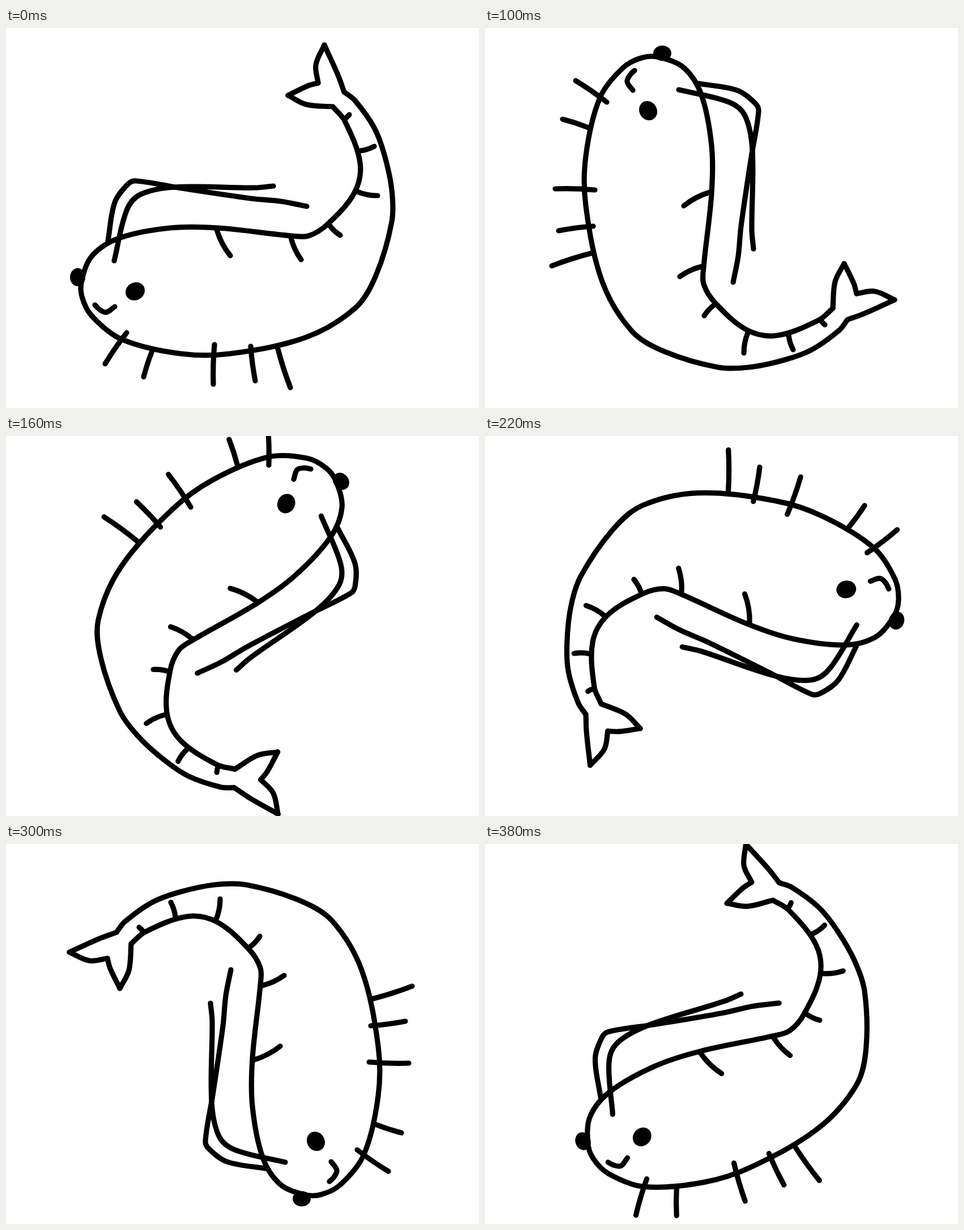
Animation, 835 px wide and 671 px high, one loop 0.4 s. Source, as an HTML page:

```html
<!DOCTYPE html>
<html lang="en">
<head>
<meta charset="utf-8">
<title>Spinning shrimp</title>
<style>
  html, body { margin: 0; width: 100%; height: 100%; overflow: hidden; background: #fff; }
  svg { display: block; }
</style>
</head>
<body>
<svg width="835" height="671">
  <g id="shrimp" fill="none" stroke="#000" stroke-width="9.2" stroke-linecap="round" stroke-linejoin="round">
    <g fill="#000" stroke="none">
      <ellipse id="nose" cx="126.5" cy="440" rx="13.5" ry="16"/>
      <ellipse id="eye" cx="228" cy="465" rx="17.5" ry="15.5" transform="rotate(-30 228 465)"/>
    </g>
  </g>
</svg>
<script>
const STEP_MS = 20, STEPS = 20;
const shrimp = document.getElementById('shrimp');

function addPath(d) {
  const path = document.createElementNS(shrimp.namespaceURI, 'path');
  path.setAttribute('d', d);
  shrimp.append(path);
}

const parse = text => text.split(' ').map(s => s.split(',').map(Number));

// Smooth stroke through key points; handles are a third of each chord
function curve(text) {
  const p = parse(text);
  const at = i => p[Math.max(0, Math.min(p.length - 1, i))];
  const handle = (i, length) => {
    const [ax, ay] = at(i - 1), [bx, by] = at(i + 1);
    const k = length / 3 / Math.hypot(bx - ax, by - ay);
    return [p[i][0] + (bx - ax) * k, p[i][1] + (by - ay) * k];
  };
  let d = 'M' + p[0];
  for (let i = 1; i < p.length; i++) {
    const chord = Math.hypot(p[i][0] - p[i - 1][0], p[i][1] - p[i - 1][1]);
    d += `C${handle(i - 1, chord)} ${handle(i, -chord)} ${p[i]}`;
  }
  addPath(d);
}

// Short stroke between two points, bent sideways by a share of its length
function tick(text, bow) {
  const [[ax, ay], [bx, by]] = parse(text);
  const cx = (ax + bx) / 2 - (by - ay) * bow;
  const cy = (ay + by) / 2 + (bx - ax) * bow;
  addPath(`M${ax} ${ay}Q${cx} ${cy} ${bx} ${by}`);
}

const body = '597,113 616,128 650,176 668,224 681,286 681,342 653,437 617,494 530,546 396,575 308,575 ' +
  '205,550 152,509 134,474 134,444 153,401 200,371 290,353 374,353 504,367 534,367 567,347 615,291 625,238 598,164 577,139';
const tail = ['597,113 586,83 562,30', '562,30 547,65 551,97', '551,97 533,102 498,119', '498,119 530,135 577,139'];
const antennae = ['180,376 192,308 215,276 229,270 310,283 432,301 485,306 531,315',
  '191,411 213,322 237,294 298,281 439,282 472,279'];
const mouth = '157,489 165,497 177,502 192,492';
const segments = ['372,356 396,402', '503,370 521,409', '570,347 590,366', '620,289 656,296', '624,217 650,209', '597,161 606,153'];
const legs = ['213,538 175,593', '258,570 243,616', '368,559 366,629', '432,562 440,623', '479,563 502,635'];

[body, ...tail, ...antennae, mouth].forEach(curve);
segments.forEach(s => tick(s, 0.1));
legs.forEach(s => tick(s, 0.03));

let start;
function draw(now) {
  start ??= now;
  const step = Math.floor((now - start) / STEP_MS) % STEPS;
  shrimp.setAttribute('transform', `rotate(${step * 360 / STEPS} 417.5 335.5)`);
  requestAnimationFrame(draw);
}
requestAnimationFrame(draw);
</script>
</body>
</html>
```
